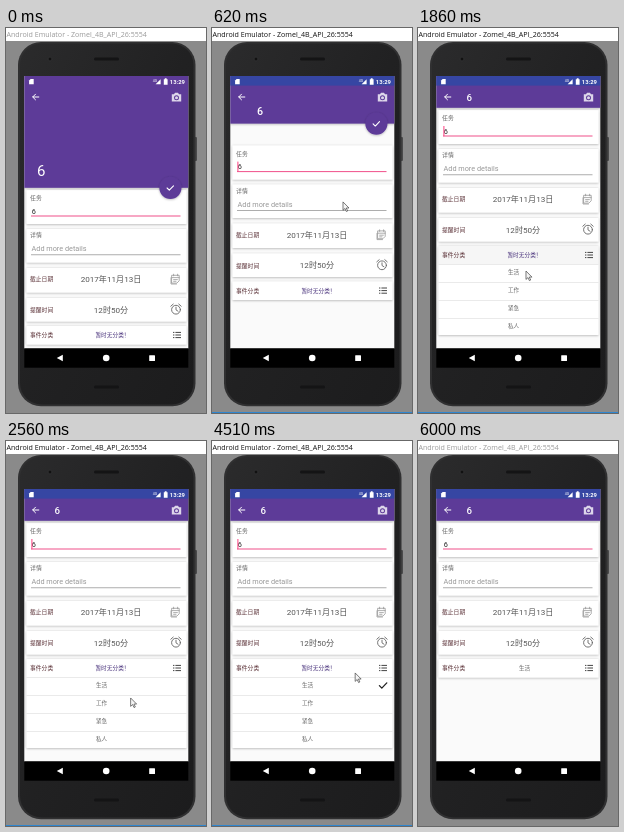
An HTML page that plays this animation: 200x385 px, repeating every 6320 ms.

```html
<!DOCTYPE html>
<html lang="zh">
<head>
<meta charset="utf-8">
<title>Emulator</title>
<style>
html, body { margin: 0; width: 100%; height: 100%; overflow: hidden; background: #8a8a8a; }
svg { display: block; width: 200px; height: 385px; }
text { font-family: Roboto, "Noto Sans CJK SC", "Noto Sans CJK", sans-serif; }
.win { font: 7.1px "Open Sans", "Noto Sans", sans-serif; }
.label { font-size: 5.9px; fill: #666; }
.name { font-size: 5.8px; font-weight: 500; fill: #5a3036; }
.value { font-size: 8.1px; fill: #555; text-anchor: middle; }
.item { font-size: 5.6px; fill: #666; }
.line { fill: none; stroke-linecap: round; stroke-linejoin: round; }
</style>
</head>
<body>
<svg viewBox="0 0 200 385" xmlns="http://www.w3.org/2000/svg">
  <defs>
    <clipPath id="screen"><rect x="18.3" y="48" width="164" height="272.4"/></clipPath>
    <clipPath id="listClip"><rect id="listBox" x="20" y="317" width="161" height="0"/></clipPath>
    <filter id="shade" x="-10%" y="-20%" width="120%" height="150%">
      <feDropShadow dx="0" dy=".6" stdDeviation=".8" flood-color="#000" flood-opacity=".3"/>
    </filter>
    <linearGradient id="body" x2="1" y2="1">
      <stop stop-color="#2b2b2c"/>
      <stop offset=".5" stop-color="#212122"/>
      <stop offset="1" stop-color="#1c1c1d"/>
    </linearGradient>
  </defs>

  <rect width="200" height="385" fill="#8a8a8a"/>
  <rect width="200" height="13" fill="#fff"/>
  <text id="winTitle" class="win" x="0.5" y="8.5">Android Emulator - Zomel_4B_API_26:5554</text>
  <rect id="edge" y="384" width="200" height="1" fill="#2f86cf"/>

  <rect x="188" y="109" width="3" height="24" rx="1" fill="#4a4a4b"/>
  <rect x="12" y="14" width="177.5" height="364.3" rx="23" fill="#303031"/>
  <rect x="14" y="15.5" width="173.5" height="361" rx="21.5" fill="url(#body)"/>
  <rect x="88" y="29.5" width="25" height="3" rx="1.5" fill="#141415"/>
  <rect x="88" y="357.5" width="25" height="3" rx="1.5" fill="#141415"/>
  <circle cx="44" cy="31" r="1.9" fill="#111" stroke="#3a3a3b" stroke-width=".6"/>

  <g clip-path="url(#screen)">
    <rect x="18" y="48" width="165" height="273" fill="#fafafa"/>
    <g id="content">
      <g id="cards" fill="#fff" filter="url(#shade)"></g>
      <text class="label" x="24" y="172.3">任务</text>
      <text x="25.8" y="185.8" font-size="7.3" fill="#222">6</text>
      <rect id="caret" x="25.4" y="178" width="1" height="10.2" fill="#ff4081"/>
      <rect x="25" y="187.5" width="149.5" height="1" fill="#f0508a"/>
      <text class="label" x="24" y="209.3">详情</text>
      <text x="25.5" y="223.1" font-size="7.3" fill="#999">Add more details</text>
      <rect x="25" y="226.4" width="149.5" height=".8" fill="#999"/>

      <text class="name" x="24" y="253.4">截止日期</text>
      <text class="value" x="105" y="254">2017年11月13日</text>
      <g class="line" stroke="#999" stroke-width=".8">
        <path d="M165 249.8v6.2h5.5M166 247.3h7.2v5.5l-2.3 2.3h-4.9zM166 249.6h7.2M167.6 246.2v1.6M171.6 246.2v1.6M167.6 251.6h3.8M167.6 253.3h2.4"/>
      </g>
      <text class="name" x="24" y="284.2">提醒时间</text>
      <text class="value" x="105" y="284.6">12时50分</text>
      <g class="line" stroke="#666" stroke-width=".9">
        <circle cx="170" cy="281.7" r="4.4"/>
        <path d="M170 279.2v2.7l2 1.3M164.8 278.2l2.4-2.1M175.2 278.2l-2.4-2.1"/>
      </g>

      <rect id="ripple" x="20.5" y="298" width="160" height="18" fill="#000"/>
      <text class="name" x="24" y="309.3">事件分类</text>
      <text id="kind" y="309.2" x="106.5" text-anchor="middle"></text>
      <path fill="none" stroke="#444" d="M167 304.4h1.4M169.4 304.4h5.6M167 307h1.4M169.4 307h5.6M167 309.6h1.4M169.4 309.6h5.6"/>
      <g clip-path="url(#listClip)">
        <g id="rows"></g>
        <path id="tick" class="line" stroke="#222" stroke-width="1.3" d="M167.4 324.6l2.4 2.5 5-5.2"/>
      </g>
    </g>

    <rect id="bar" x="18" y="48" width="165" fill="#5d3b98" filter="url(#shade)"/>
    <rect id="status" x="18" y="48" width="165" height="9.6" fill="#3646a3"/>
    <text id="title" fill="#fff">6</text>
    <path class="line" stroke="#fff" stroke-width="1" d="M32.8 69h-6M29.5 66.2l-2.8 2.8 2.8 2.8"/>
    <g fill="#ddd6ea">
      <path d="M165.8 66.2h2.2l1-1.5h3l1 1.5h2.2v7.2h-9.4z"/>
      <circle cx="170.5" cy="69.7" r="2.5" fill="#5d3b98"/>
      <circle cx="170.5" cy="69.7" r="1.5"/>
    </g>
    <g fill="#fff">
      <path d="M24.6 51h3.1v5.2h-4.6v-3.7z"/>
      <text x="146.8" y="54.2" font-size="3.6">4G</text>
      <path d="M154.6 51.2v5h-5z"/>
      <path d="M157.8 51.2h1v-.9h1.8v.9h1v5.6h-3.8z"/>
      <text x="163.8" y="55.9" font-size="5.9" font-weight="700">13:29</text>
    </g>
    <g id="fab">
      <circle r="11.1" fill="#5d3b98" filter="url(#shade)"/>
      <path class="line" stroke="#fff" stroke-width="1.1" d="M-3.3 .2l2.2 2.2 4.2-4.4"/>
    </g>
  </g>

  <rect x="18.3" y="320.4" width="164" height="19.3" fill="#000"/>
  <g fill="#fff">
    <path d="M50.8 330l6-3.3v6.6z"/>
    <circle cx="100.2" cy="330" r="3.3"/>
    <rect x="143.2" y="327.2" width="5.8" height="5.8" rx=".5"/>
  </g>

  <path id="mouse" d="M0 0v8.4l2-1.8 1.4 3 1.3-.6-1.4-2.9h2.7z" fill="#f4f4f4" stroke="#444" stroke-width=".7" stroke-linejoin="round"/>
</svg>
<script>
const LOOP = 6320;
const $ = id => document.getElementById(id);
const set = (id, attrs) => {
  for (const k in attrs) $(id).setAttribute(k, attrs[k]);
};
const clamp = v => Math.max(0, Math.min(1, v));
const smooth = v => v * v * (3 - 2 * v);
const ramp = (t, a, b) => smooth(clamp((t - a) / (b - a)));
const show = (id, on) => set(id, { visibility: on ? "visible" : "hidden" });

// Linear interpolation through [time, ...values] keys
function track(keys, t) {
  let i = 0;
  while (i < keys.length - 2 && t >= keys[i + 1][0]) i++;
  const [a, b] = [keys[i], keys[i + 1]];
  const k = clamp((t - a[0]) / (b[0] - a[0]));
  return a.slice(1).map((v, n) => v + (b[n + 1] - v) * k);
}

// Shifts of the app bar and of the page, which lags during the fling
const SHRINK = 80;
const scrollKeys = [[460, 0, 0], [620, -64, -44], [710, -SHRINK, -SHRINK]];
const mouseKeys = [
  [70, 186, 376], [390, 134, 238], [460, 134, 236], [620, 131, 174],
  [710, 130, 166], [1000, 121, 225], [1250, 118, 227], [1480, 118, 227],
  [1860, 108, 243], [2090, 102, 247], [2180, 104, 249], [2450, 137, 263],
  [2800, 98, 244], [3110, 98, 243], [3330, 104, 267], [3640, 112, 325],
  [3720, 113, 326], [4340, 147, 236], [4510, 143, 232], [4660, 168, 226],
  [4760, 168, 226], [5140, 182, 376], [5220, 186, 377]
];

$("cards").innerHTML = [[162, 34], [201, 33.5], [240, 24.5], [270, 23.5], [298, 18.5]]
  .map(([y, h], i) => `<rect id="card${i}" x="20.5" y="${y}" width="160" height="${h}" rx=".8"/>`).join("");
$("rows").innerHTML = ["生活", "工作", "紧急", "私人"].map((s, i) => {
  const y = 316 + 18 * i;
  return `<rect x="20.5" y="${y}" width="160" height=".6" fill="#ddd"/>
    <text class="item" x="90" y="${y + 10.1}">${s}</text>`;
}).join("");

function draw(t) {
  const active = t >= 390 && t < 5530;
  set("winTitle", { fill: active ? "#111" : "#999" });
  show("edge", active);

  const [bar, page] = track(scrollKeys, t);
  const p = -bar / SHRINK;
  set("content", { transform: `translate(0 ${page})` });
  set("bar", { height: 111.8 + bar });
  set("status", { opacity: clamp((p - 0.55) / 0.2) });
  set("title", {
    x: 31 + 17.6 * p, y: 148 - 75.5 * p,
    "font-size": 15 - 5.3 * p, "font-weight": p > 0.5 ? 500 : 400
  });
  const size = 1 - ramp(t, 630, 790);
  set("fab", { transform: `translate(164.4 ${159.8 + bar}) scale(${size})` });
  show("fab", size > 0);

  const open = ramp(t, 1540, 1820) * (1 - ramp(t, 4700, 4940));
  set("listBox", { y: 315.5, height: 71 * open });
  set("card4", { height: 18.5 + 70.5 * open });
  set("ripple", { opacity: 0.035 * ramp(t, 1480, 1600) * (1 - ramp(t, 1900, 2090)) });
  show("tick", t >= 3110);
  show("caret", Math.floor(t / 500) % 2 === 1);

  const chosen = t >= 4700;
  $("kind").textContent = chosen ? "生活" : "暂时无分类！";
  set("kind", { fill: chosen ? "#666" : "#47307a", "font-size": chosen ? 5.6 : 5.7 });

  const [x, y] = track(mouseKeys, t);
  set("mouse", { transform: `translate(${x} ${y})` });
  show("mouse", t >= 70 && t < 5300);
}

const start = performance.now();
function tick() {
  draw((performance.now() - start) % LOOP);
  requestAnimationFrame(tick);
}
draw(0);
requestAnimationFrame(tick);
</script>
</body>
</html>
```
